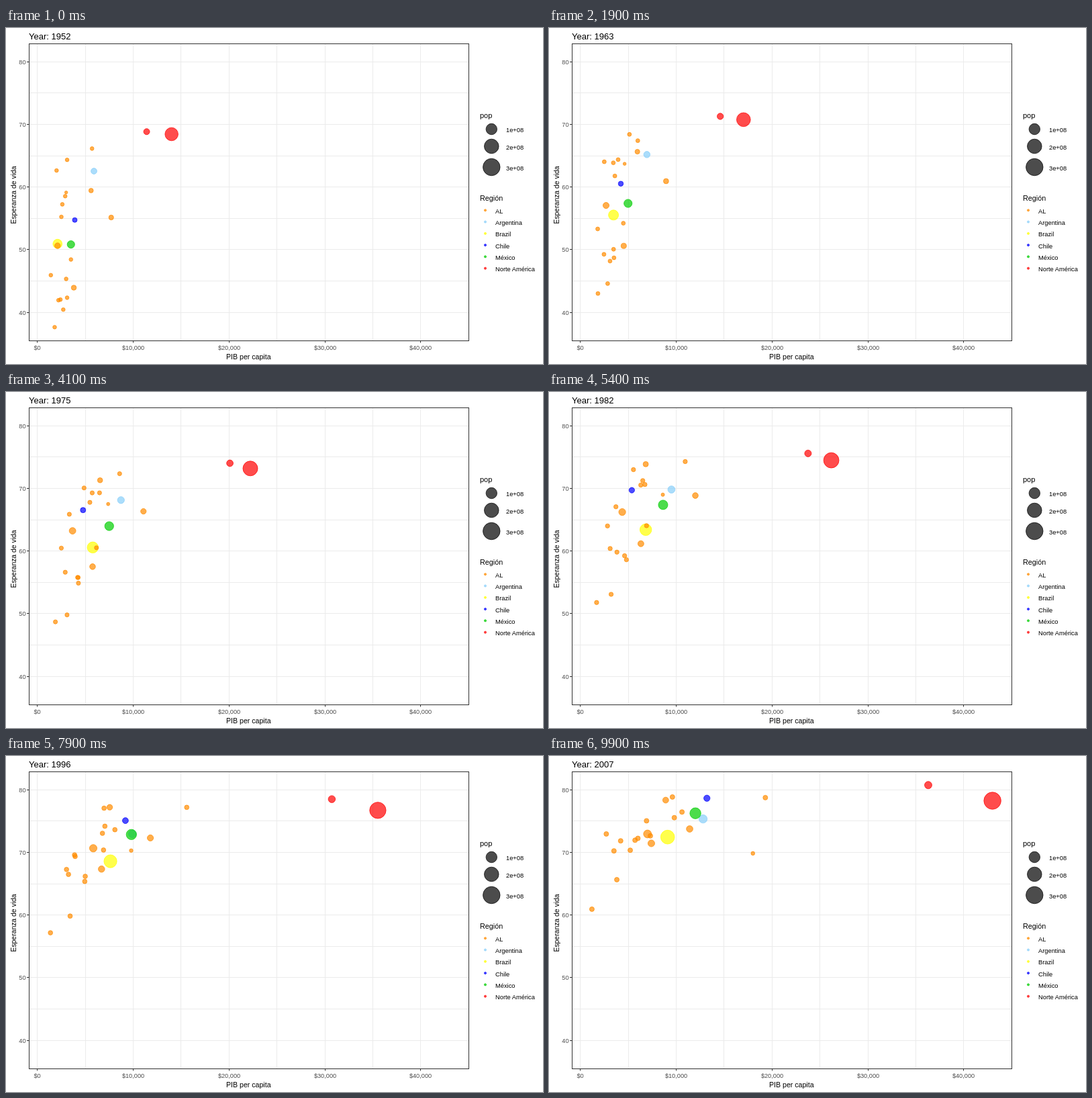
These frames come from a looping animation (800x500 px, 10 s). An HTML page:

```html
<!DOCTYPE html>
<html lang="es">
<head>
<meta charset="utf-8">
<title>Esperanza de vida y PIB per capita</title>
<style>
  html, body { margin: 0; width: 100%; height: 100%; overflow: hidden; background: #fff; }
  svg { display: block; font-family: "Liberation Sans", Arial, sans-serif; }
  .grid { stroke: #ebebeb; }
  .axis { stroke: #333; fill: none; }
  .tick { font-size: 9.2px; fill: #4d4d4d; }
  .label { font-size: 9.3px; }
  .dot { fill-opacity: .7; stroke-opacity: .7; }
</style>
</head>
<body>
<svg id="stage" width="800" height="500" viewBox="0 0 800 500"></svg>
<script>
const FRAME_MS = 100, FRAMES = 100, FIRST_YEAR = 1952, SPAN = 55;
const NORTH = 'Norte América';
const COLORS = {
  AL: '#ff8c00', Argentina: '#87cefa', Brazil: '#ffff00',
  Chile: '#0000ff', 'México': '#00cd00', [NORTH]: '#ff0000'
};
const stage = document.getElementById('stage');

// GDP is in thousands of dollars, population in millions.
const toX = gdp => 46.8 + gdp * 14.275;
const toY = life => 49.8 + (80 - life) * 9.325;
const snap = v => Math.floor(v) + 0.5;
const mix = (a, b, k) => a + (b - a) * k;
const sizeOf = pop => 2 + 10 * Math.sqrt(Math.max(0, pop - 0.66) / 300.48);
const radiusOf = size => 0.375 * (size * 2.845 + 0.945) - 0.4;

function add(tag, attrs, text) {
  const node = document.createElementNS('http://www.w3.org/2000/svg', tag);
  for (const name in attrs) node.setAttribute(name, attrs[name]);
  if (text !== undefined) node.textContent = text;
  stage.appendChild(node);
  return node;
}
const line = (kind, x1, y1, x2, y2) => add('line', { class: kind, x1, y1, x2, y2 });
const write = (x, y, text, attrs) => add('text', { x, y, ...attrs }, text);
const circle = (cx, cy, r, color) =>
  add('circle', { class: 'dot', cx, cy, r, fill: color, stroke: color });

function drawAxes() {
  for (let gdp = 0; gdp <= 40; gdp += 5) {
    const x = snap(toX(gdp));
    line('grid', x, 24, x, 465);
    if (gdp % 10) continue;
    line('axis', x, 466, x, 468.5);
    write(x, 479, gdp ? `$${gdp},000` : '$0', { class: 'tick', 'text-anchor': 'middle' });
  }
  for (let life = 40; life <= 80; life += 5) {
    const y = snap(toY(life) + 0.4);
    line('grid', 35, y, 689, y);
    if (life % 10) continue;
    line('axis', 31, y, 34, y);
    write(29.5, y + 3.7, life, { class: 'tick', 'text-anchor': 'end' });
  }
  write(361.3, 493, 'PIB per capita', { 'font-size': 10.6, 'text-anchor': 'middle' });
  write(0, 0, 'Esperanza de vida', {
    'font-size': 10.4, 'text-anchor': 'middle', transform: 'translate(15 248.5) rotate(-90)'
  });
}

function drawLegend() {
  write(706, 134, 'pop', { 'font-size': 11 });
  [150.5, 176, 207].forEach((y, i) => {
    circle(723.3, y, radiusOf(sizeOf(100 * (i + 1))), '#000');
    write(745, y + 4.5, `${i + 1}e+08`, { class: 'label' });
  });
  write(706, 257, 'Región', { 'font-size': 10.8 });
  Object.keys(COLORS).forEach((name, i) => {
    const y = 271.2 + i * 17.28;
    circle(714, y, radiusOf(1.5), COLORS[name]);
    write(729, y + 4.5, name, { class: 'label' });
  });
}

// Growth gathers pace up to the middle year; the lag then sets how late the rest comes.
function gdpAt([start, middle, end], lag, p) {
  return p < 0.5
    ? mix(start, middle, (2 * p) ** 1.3)
    : mix(middle, end, (2 * p - 1) ** lag);
}

// Parabola through the first, middle and last value.
function lifeAt([start, middle, end], p) {
  const lift = middle - (start + end) / 2;
  return mix(start, end, p) + 4 * lift * p * (1 - p);
}

const dots = [];
function country(region, gdp, life, { pop = 2, lag = region === NORTH ? 1 : 2 } = {}) {
  const growth = region === NORTH ? 1.92 : 3;
  const sizes = [sizeOf(pop), sizeOf(pop * growth)];
  dots.push({ node: circle(0, 0, 0, COLORS[region]), gdp, life, lag, sizes });
}

drawAxes();

// Key values for the first, middle and last year.
country('Argentina', [5.9, 9.5, 12.8], [62.5, 69.2, 75.3], { pop: 15, lag: 4 });
country('AL', [2.7, 3.2, 3.8], [40.4, 51.9, 65.6]);
country('Brazil', [2.1, 6.8, 9.1], [50.9, 62.4, 72.4], { pop: 60 });
country(NORTH, [11.4, 22.5, 36.3], [68.8, 75, 80.7], { pop: 16 });
country('Chile', [3.9, 5, 13.2], [54.7, 68.6, 78.6], { pop: 6, lag: 1.3 });
country('AL', [2.1, 4.1, 7], [50.6, 65.2, 72.9], { pop: 13, lag: 1 });
country('AL', [2.6, 5.5, 9.6], [57.2, 72, 78.8]);
country('AL', [5.6, 6.8, 8.9], [59.4, 73, 78.3], { pop: 5 });
country('AL', [1.4, 2.8, 6], [45.9, 62.8, 72.2]);
country('AL', [3.5, 6.9, 6.9], [48.4, 62.8, 75]);
country('AL', [3, 4.6, 5.7], [45.3, 58, 71.9]);
country('AL', [2.4, 4.8, 5.2], [42, 57.3, 70.3]);
country('AL', [1.8, 1.9, 1.2], [37.6, 50.7, 60.9], { lag: 0.5 });
country('AL', [2.2, 3.1, 3.5], [41.9, 59.1, 70.2]);
country('AL', [2.9, 6.5, 7.3], [58.5, 70.6, 72.6]);
country('México', [3.5, 8.6, 12], [50.8, 66.2, 76.2], { pop: 33 });
country('AL', [3.1, 4.5, 2.7], [42.3, 58.4, 72.9], { lag: 0.4 });
country('AL', [2.5, 6.3, 9.8], [55.2, 69.6, 75.5], { lag: 3 });
country('AL', [2, 3.7, 4.2], [62.6, 66.6, 71.8]);
country('AL', [3.8, 6.3, 7.4], [43.9, 59.9, 71.4], { pop: 8 });
country('AL', [3.1, 10.1, 19.3], [64.3, 73.6, 78.7], { lag: 1 });
country('AL', [3, 8.6, 18], [59.1, 68.5, 69.8], { pop: 0.7, lag: 4 });
country(NORTH, [14, 24.5, 43], [68.4, 74, 78.2], { pop: 157 });
country('AL', [5.7, 6.7, 10.6], [66.1, 70.1, 76.4]);
country('AL', [7.7, 12, 11.4], [55.1, 68, 73.7], { pop: 7 });

add('rect', { class: 'axis', x: 34.5, y: 23.5, width: 655, height: 442 });
drawLegend();
const title = write(34, 17, '', { 'font-size': 13 });

function show(frame) {
  const p = frame / (FRAMES - 1);
  title.textContent = 'Year: ' + Math.round(FIRST_YEAR + p * SPAN);
  for (const { node, gdp, life, lag, sizes } of dots) {
    node.setAttribute('cx', toX(gdpAt(gdp, lag, p)));
    node.setAttribute('cy', toY(lifeAt(life, p)));
    node.setAttribute('r', radiusOf(mix(...sizes, p)));
  }
}

let start, shown;
function tick() {
  const now = performance.now();
  start ??= now;
  const frame = Math.floor((now - start) / FRAME_MS) % FRAMES;
  if (frame !== shown) show(shown = frame);
  requestAnimationFrame(tick);
}
tick();
</script>
</body>
</html>
```
